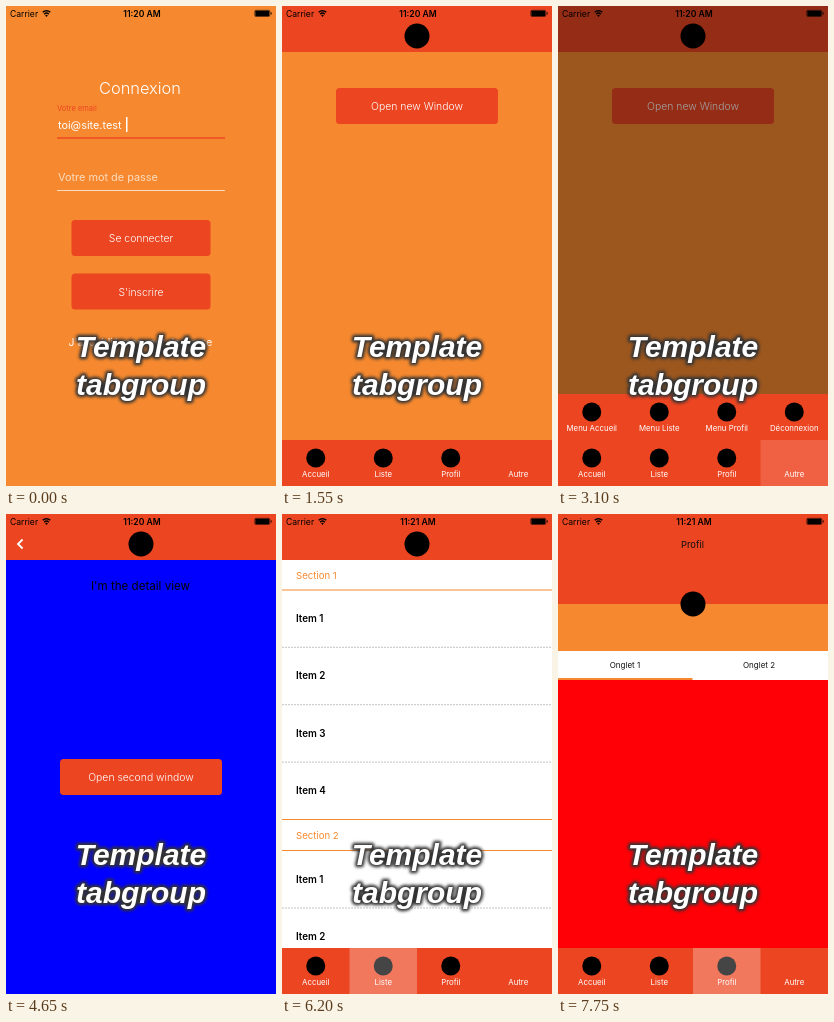
An HTML page for the animation above (9.3 s loop, 270 by 480 pixels).

```html
<!DOCTYPE html>
<html lang="fr">
<head>
<meta charset="utf-8">
<title>Template tabgroup</title>
<style>
html, body { margin: 0; width: 100%; height: 100%; overflow: hidden; background: #f6892f; }
svg { display: block; width: 100vw; height: 100vh; }
text { font-family: Inter, Roboto, sans-serif; white-space: pre; }
.caption text { font: italic bold 30px "Liberation Sans", Arial, sans-serif; }
</style>
</head>
<body>
<svg id="stage" viewBox="0 0 270 480"></svg>
<script>
const ORANGE = '#f6892f', RED = '#ec4521', PALE = '#fbdcc0', GREY = '#c4c4c4';
const HOLD = 1550;
const TAB = 67.5;

const rect = (x, y, w, h, fill, rx = 0) =>
  `<rect x="${x}" y="${y}" width="${w}" height="${h}" fill="${fill}" rx="${rx}"/>`;
const text = (x, y, str, size, { fill = '#fff', weight = 400, anchor = 'middle' } = {}) =>
  `<text x="${x}" y="${y}" font-size="${size}" font-weight="${weight}" fill="${fill}" text-anchor="${anchor}">${str}</text>`;
const icon = (x, y, r) => `<circle cx="${x}" cy="${y}" r="${r}"/>`;
const rule = (y, color, dash = '') =>
  `<path d="M0 ${y}H270" stroke="${color}" stroke-width="1" stroke-dasharray="${dash}"/>`;

const button = (x, y, w, label) =>
  rect(x, y, w, 36, RED, 3.5) + text(x + w / 2, y + 22, label, 10.4, { weight: 300 });

function statusBar(time) {
  return text(4, 10.5, 'Carrier', 8.6, { fill: '#000', anchor: 'start' }) +
    `<g fill="none" stroke="#000" stroke-width="1.4">
      <path d="M36.7 6.3a5.4 5.4 0 0 1 7.6 0M38.2 8.2a3.3 3.3 0 0 1 4.6 0"/>
    </g><path d="M39.2 9.5a1.8 1.8 0 0 1 2.6 0L40.5 11Z"/>` +
    text(136, 10.5, time, 8.6, { fill: '#000', weight: 600 }) +
    `<rect x="248.8" y="4.3" width="15" height="6.2" rx="1.2" fill="none" stroke="#000" stroke-width=".6"/>` +
    rect(249.4, 4.8, 13.8, 5.2, '#000', 0.5) + rect(264.6, 6.3, 1, 2.2, '#000', 0.5);
}

function tabRow(y, labels, { active = -1, glow = 0.27, icons = 3 } = {}) {
  return rect(0, y, 270, 46, RED) + labels.map((label, i) => {
    const x = TAB * (i + 0.5);
    return (i < icons ? icon(x, y + 18, 9.5) : '') +
      (i === active ? rect(TAB * i, y, TAB, 46, `rgba(255,255,255,${glow})`) : '') +
      text(x, y + 37, label, 7.85);
  }).join('');
}

const tabs = (active, glow) =>
  tabRow(434, ['Accueil', 'Liste', 'Profil', 'Autre'], { active, glow });
const header = () => rect(0, 0, 270, 46, RED) + icon(135, 30, 12.5);
const home = () => header() + button(54, 82, 162, 'Open new Window');

function login() {
  return text(134, 88, 'Connexion', 16.4, { weight: 300 }) +
    text(51, 105, 'Votre email', 7.5, { fill: RED, anchor: 'start' }) +
    text(52, 122.5, 'toi@site.test', 10.9, { anchor: 'start' }) +
    rect(120, 111, 1.5, 15, '#fff') +
    rect(51, 131.3, 168, 1.4, RED) +
    text(52, 175, 'Votre mot de passe', 10.9, { fill: PALE, anchor: 'start' }) +
    rect(51, 184, 168, 1, PALE) +
    button(65.5, 214, 139, 'Se connecter') +
    button(65.5, 267.5, 139, "S'inscrire") +
    text(134.5, 340, "J'ai oublié mon mot de passe", 10.4);
}

function menu() {
  const labels = ['Menu Accueil', 'Menu Liste', 'Menu Profil', 'Déconnexion'];
  return home() + rect(0, 0, 270, 480, 'rgba(0,0,0,.37)') +
    tabRow(388, labels, { icons: 4 }) + tabs(3, 0.15);
}

function detail() {
  return rect(0, 0, 270, 480, '#00f') + header() +
    '<path d="M16.6 25.5L12 30l4.6 4.5" fill="none" stroke="#fff" stroke-width="1.8"/>' +
    text(134.5, 76, "I'm the detail view", 11.6, { fill: '#000' }) +
    button(54, 245, 162, 'Open second window');
}

function list() {
  const section = (y, n) => rule(y, ORANGE) +
    text(14, y - 11.2, 'Section ' + n, 9.6, { fill: ORANGE, anchor: 'start' });
  const item = (y, n) =>
    text(14, y, 'Item ' + n, 9.8, { fill: '#000', weight: 600, anchor: 'start' });
  let out = rect(0, 46, 270, 388, '#fff') + section(76, 1) + section(336.5, 2);
  for (let i = 0; i < 4; i++) {
    out += item(108 + i * 57.4, i + 1);
    if (i < 3) out += rule(133.3 + i * 57.4, GREY, '2 1');
  }
  return out + rule(305.5, ORANGE) + item(368.6, 1) + rule(394, GREY, '2 1') +
    item(426, 2) + header() + tabs(1);
}

function profile() {
  const dark = { fill: '#111' };
  return rect(0, 0, 270, 90, RED) + text(134.5, 34, 'Profil', 9.4, dark) +
    icon(135, 90, 12.5) + rect(0, 137, 270, 29, '#fff') +
    text(67, 154, 'Onglet 1', 8, dark) + text(201, 154, 'Onglet 2', 8, dark) +
    rect(0, 166, 270, 268, '#fe0006') + rect(0, 164, 134.5, 2, ORANGE) + tabs(2);
}

const caption = [['Template', 350.5], ['tabgroup', 389]]
  .map(([word, y]) => `<text x="135" y="${y}" text-anchor="middle">${word}</text>`).join('');
const blur = (id, amount) =>
  `<filter id="${id}" x="-20%" y="-20%" width="140%" height="140%"><feGaussianBlur stdDeviation="${amount}"/></filter>`;

const scenes = [
  [login, '11:20 AM'],
  [() => home() + tabs(), '11:20 AM'],
  [menu, '11:20 AM'],
  [detail, '11:20 AM'],
  [list, '11:21 AM'],
  [profile, '11:21 AM']
];

const stage = document.getElementById('stage');
stage.innerHTML =
  `<defs>${blur('halo', 1.6)}${blur('soft', 0.5)}</defs>` +
  rect(0, 0, 270, 480, ORANGE) +
  scenes.map(([draw, time]) => `<g class="scene">${draw()}${statusBar(time)}</g>`).join('') +
  `<g class="caption">
    <g filter="url(#halo)" fill="#333" stroke="#333" stroke-width="4.5" stroke-linejoin="round">${caption}</g>
    <g filter="url(#soft)" fill="#fff">${caption}</g>
  </g>`;

const groups = [...stage.querySelectorAll('.scene')];

function render(ms) {
  const current = Math.floor(ms / HOLD) % groups.length;
  groups.forEach((g, i) => g.setAttribute('display', i === current ? 'inline' : 'none'));
}

const start = performance.now();
function tick() {
  render(performance.now() - start);
  requestAnimationFrame(tick);
}
tick();
</script>
</body>
</html>
```
